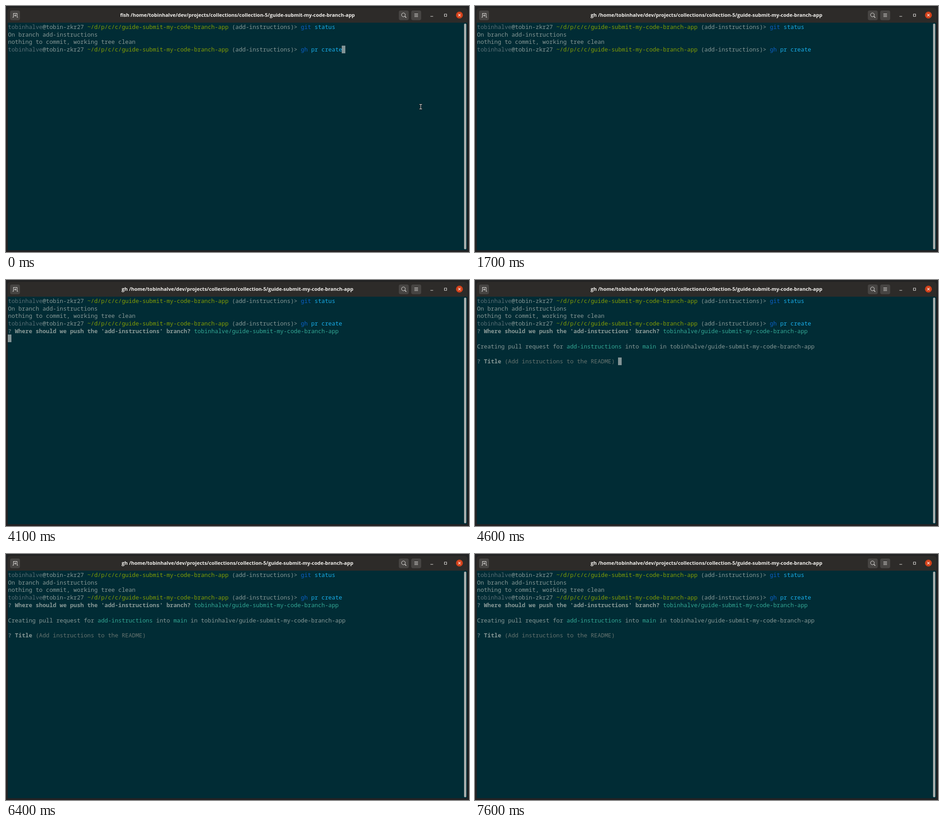
An HTML page with a canvas that plays this animation: 1026 by 546 pixels, repeating every 8000 ms.

```html
<!DOCTYPE html>
<html lang="en">
<head>
<meta charset="utf-8">
<title>Terminal</title>
<style>
  html, body { margin: 0; width: 100%; height: 100%; overflow: hidden; background: #222223; }
  canvas { display: block; width: 1026px; height: 546px; }
</style>
</head>
<body>
<canvas id="stage" width="1026" height="546"></canvas>
<script>
const ctx = document.getElementById('stage').getContext('2d');

const LOOP = 8000;
const FONT = 12.72;
const CELL = FONT * 0.6;
const ROW = 16.8;
const LEFT = 4.6;
const TOP = 37.7;

const USER = 'tobinhalve';
const HOST = 'tobin-zkr27';
const REPO = 'guide-submit-my-code-branch-app';
const PATH = `/home/${USER}/dev/projects/collections/collection-5/${REPO}`;
const BRANCH = 'add-instructions';

const color = {
  back: '#012c35', text: '#879896', dim: '#586e75', hint: '#66736f', green: '#849e04',
  teal: '#33a794', blue: '#0a5fc6', sky: '#18aeea', cursor: '#839496', icon: '#e9e7e4'
};

// A line is a list of [text, colour, bold] runs.
const prompt = (command, args) => [
  [USER, color.dim], [`@${HOST} `, color.text],
  [`~/d/p/c/c/${REPO}`, color.green], [` (${BRANCH})> `, color.text],
  [command, color.blue], [' ' + args, color.sky]
];

const shell = [
  prompt('git', 'status'),
  [[`On branch ${BRANCH}`, color.text]],
  [['nothing to commit, working tree clean', color.text]],
  prompt('gh', 'pr create')
];

const question = [
  ['? ', color.dim, true],
  [`Where should we push the '${BRANCH}' branch?`, color.text, true]
];

const menu = [
  [...question, ['  [Use arrows to move, type to filter]', color.teal]],
  [[`> ${USER}/${REPO}`, color.teal, true]],
  [['  Skip pushing the branch', color.text]],
  [['  Cancel', color.text]]
];

const answer = [[...question, [` ${USER}/${REPO}`, color.teal]]];

const form = [
  [],
  [['Creating pull request for ', color.text], [BRANCH, color.teal],
   [' into ', color.text], ['main', color.teal],
   [` in ${USER}/${REPO}`, color.text]],
  [],
  [['? ', color.dim, true], ['Title', color.text, true],
   [' (Add instructions to the README) ', color.hint]]
];

function box(x, y, w, h, r, fill) {
  ctx.fillStyle = fill;
  ctx.beginPath();
  ctx.roundRect(x, y, w, h, r);
  ctx.fill();
}

function stroke(lines, style = color.icon, width = 1) {
  ctx.strokeStyle = style;
  ctx.lineWidth = width;
  ctx.beginPath();
  for (const [x1, y1, x2, y2] of lines) {
    ctx.moveTo(x1, y1);
    ctx.lineTo(x2, y2);
  }
  ctx.stroke();
}

function drawLine(runs, row) {
  let col = 0;
  for (const [text, fill, bold] of runs) {
    ctx.font = `${bold ? 700 : 400} ${FONT}px "Noto Sans Mono", "DejaVu Sans Mono", monospace`;
    ctx.fillStyle = fill;
    ctx.fillText(text, LEFT + col * CELL, TOP + row * ROW + 13);
    col += text.length;
  }
}

function drawCursor(col, row) {
  const x = Math.floor(LEFT + col * CELL);
  const y = Math.floor(TOP + row * ROW);
  box(x, y, 8, 17, 0, color.cursor);
}

function drawButtons() {
  for (const x of [9, 870.5, 898]) box(x, 10, 22, 21.5, 4, '#474543');

  // new tab
  stroke([[14.5, 25, 17, 25], [16.5, 25, 16.5, 16.5], [16, 16.5, 25, 16.5],
          [24.5, 16.5, 24.5, 25], [24, 25, 26.5, 25],
          [18, 21, 23, 21], [20.5, 18.5, 20.5, 23.5]]);

  // search
  ctx.beginPath();
  ctx.arc(880.7, 19.7, 4.2, 0, Math.PI * 2);
  ctx.stroke();
  stroke([[883.7, 22.7, 887, 26]], color.icon, 1.3);

  // menu
  stroke([17.5, 20.5, 23.5].map(y => [905, y, 913, y]));

  // window controls
  stroke([[940.5, 23, 946.5, 23]]);
  ctx.strokeRect(971.5, 18, 5, 5);
  box(997.2, 12.6, 15.2, 15.2, 7.6, '#d4421b');
  stroke([[1002.2, 17.6, 1007.4, 22.8], [1007.4, 17.6, 1002.2, 22.8]], '#fff', 1.1);
}

function drawWindow(program) {
  ctx.fillStyle = '#222223';
  ctx.fillRect(0, 0, 1026, 546);
  box(3, 4, 1020, 34, [7, 7, 0, 0], '#2d2b29');
  ctx.fillStyle = color.back;
  ctx.fillRect(4, 37, 1018, 505);
  box(1015, 39, 5, 501, 2.5, '#a6adac');
  drawButtons();

  ctx.font = '700 11px "Open Sans", "Noto Sans", sans-serif';
  ctx.fillStyle = '#f3f1ee';
  ctx.textAlign = 'center';
  ctx.fillText(`${program} ${PATH}`, 513, 24);
  ctx.textAlign = 'left';
}

function drawPointer() {
  const beam = [[916.5, 218.5, 921.5, 218.5], [919, 218.5, 919, 228.5], [916.5, 228.5, 921.5, 228.5]];
  ctx.lineCap = 'square';
  stroke(beam, '#101617', 2.6);
  stroke(beam, '#f2f2f2', 1);
  ctx.lineCap = 'butt';
}

function cursorAt(t) {
  if (t < 500) return [97, 3];
  if (t >= 1100 && t < 1700) return [0, 4];
  if (t >= 4100 && t < 4600) return [0, 5];
  if (t >= 4600 && Math.floor((t - 4600) / 600) % 2 === 0) return [41, 8];
  return null;
}

function linesAt(t) {
  if (t < 2500) return shell;
  if (t < 4100) return [...shell, ...menu];
  if (t < 4600) return [...shell, ...answer];
  return [...shell, ...answer, ...form];
}

function draw(t) {
  drawWindow(t < 1200 ? 'fish' : 'gh');
  linesAt(t).forEach(drawLine);
  const cursor = cursorAt(t);
  if (cursor) drawCursor(...cursor);
  if (t < 1100) drawPointer();
}

const start = performance.now();
function tick() {
  draw((performance.now() - start) % LOOP);
  requestAnimationFrame(tick);
}
tick();
</script>
</body>
</html>
```
